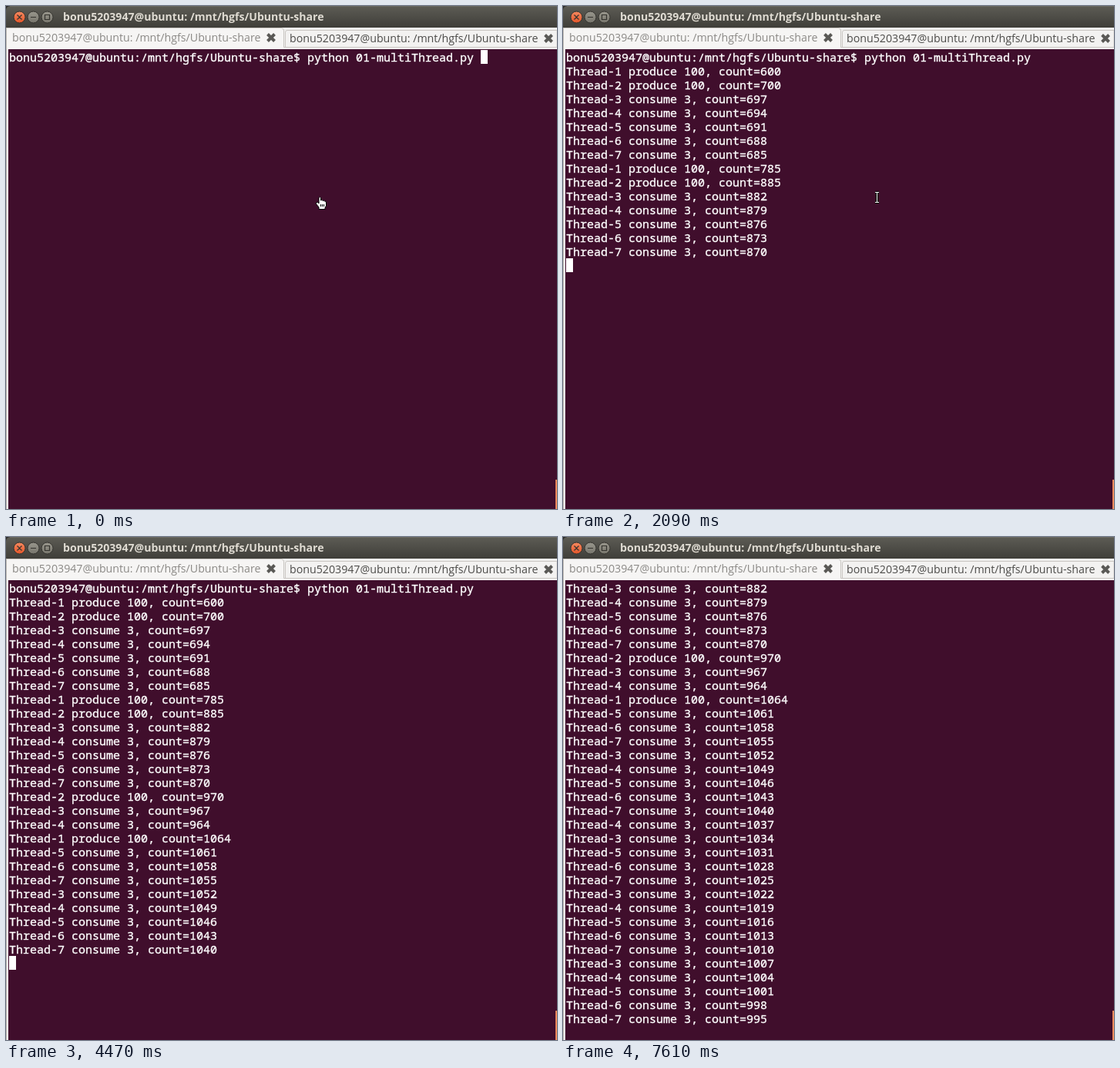
Write an HTML page that moves like this. It is 715 px wide and 652 px high and loops after 8 s.

```html
<!DOCTYPE html>
<html lang="en">
<head>
<meta charset="utf-8">
<title>Terminal</title>
<style>
  html, body { margin: 0; width: 100%; height: 100%; overflow: hidden; background: #400e2c; }
  svg { display: block; }
  text { white-space: pre; }
  .ui { font: 14.2px "Open Sans", "Noto Sans", sans-serif; }
  .title { font-size: 14.1px; font-weight: 700; fill: #dfdbd2; }
  .term { font: 500 15px "Noto Sans Mono", "DejaVu Sans Mono", monospace; fill: #fff; stroke: #fff; stroke-width: .35px; }
</style>
</head>
<body>
<svg width="715" height="652" viewBox="0 0 715 652">
  <defs>
    <linearGradient id="bar" x2="0" y2="1">
      <stop offset="0" stop-color="#5d5c55"/>
      <stop offset="1" stop-color="#3f3e39"/>
    </linearGradient>
    <linearGradient id="red" x2="0" y2="1">
      <stop offset="0" stop-color="#f68a60"/>
      <stop offset="1" stop-color="#e2552a"/>
    </linearGradient>
    <linearGradient id="grey" x2="0" y2="1">
      <stop offset="0" stop-color="#98968c"/>
      <stop offset="1" stop-color="#77756c"/>
    </linearGradient>
    <path id="close" d="M-4.5-4.5L4.5 4.5M4.5-4.5L-4.5 4.5" stroke="#5a5956" stroke-width="4"/>
  </defs>

  <rect width="715" height="652" fill="#400e2c"/>
  <rect width="715" height="28" fill="#2c2b28"/>
  <path d="M0 28V6Q0 0 6 0H715V28Z" fill="url(#bar)"/>
  <path d="M5 .5H715" stroke="#6b6a62"/>
  <g stroke="#34332e">
    <circle cx="17.5" cy="14.5" r="7.5" fill="url(#red)"/>
    <circle cx="35.5" cy="14.5" r="7.5" fill="url(#grey)"/>
    <circle cx="53.5" cy="14.5" r="7.5" fill="url(#grey)"/>
    <path d="M14.5 11.5l6 6m0-6l-6 6M32 14.5h7M50.5 11.5h6v6h-6z" fill="none" stroke-width="1.2"/>
  </g>

  <rect y="28" width="715" height="28" fill="#f2f1f0"/>
  <path d="M362.5 54V34Q362.5 31.5 365 31.5H715V53.5H362.5" fill="#f3f2f1" stroke="#c9c6c2"/>
  <path d="M0 56V28.5H357Q360.5 28.5 360.5 32V56Z" fill="#f6f5f4"/>
  <path d="M0 28.5H357Q360.5 28.5 360.5 32V53.5H715" fill="none" stroke="#c9c6c2"/>
  <rect y="54" width="715" height="2" fill="#f6f5f4"/>
  <rect y="56" width="3" height="596" fill="#f2f1f0"/>
  <rect y="28" width="1" height="624" fill="#b9b6b1"/>
  <use href="#close" x="344" y="41"/>
  <use href="#close" x="704" y="42"/>
  <g class="ui">
    <text class="title head" x="74" y="19"></text>
    <text class="head" x="8" y="46" fill="#8b8986"></text>
    <text class="head" x="368" y="47" fill="#4c4b49"></text>
  </g>

  <g id="rows" class="term"></g>
  <rect id="block" width="9" height="18" fill="#fff"/>
  <rect x="713" y="614" width="2" height="38" fill="#ef8a5c"/>

  <path id="hand" fill="#fff" stroke="#000" stroke-linejoin="round"
    d="M406 263.5V261L402.5 256.5Q402 254 404.5 254.5L406 256V248.5Q407 246.5 408.5 248.5V252Q410 250.5 411 252.5Q412.5 251.5 413.5 253Q415.5 252.5 415.5 255V259L414 261.5V263.5ZM408.5 257V260M410.5 257V260M412.5 257V260"/>
  <g id="beam" fill="none">
    <path id="bar-i" d="M-2.5-6.5H2.5M-2.5 6.5H2.5M0-7V7" stroke="#000" stroke-width="3"/>
    <use href="#bar-i"/>
    <path d="M-2.5-6.5H2.5M-2.5 6.5H2.5M0-7V7" stroke="#fff"/>
  </g>
</svg>
<script>
const LOOP = 8000, ROW = 18, TOP = 57, LEFT = 4, VISIBLE = 33;
const $ = id => document.getElementById(id);
const user = 'bonu5203947@ubuntu:', dir = '/mnt/hgfs/Ubuntu-share';
const prompt = `${user}${dir}$ python 01-multiThread.py `;

document.querySelectorAll('.head').forEach(el => el.textContent = `${user} ${dir}`);

// Threads 1 and 2 add 100 to the shared count, the others take 3.
let count = 500;
const lines = [prompt];
for (const id of '12345671234567234156734567435673456734567') {
  const make = id < 3;
  count += make ? 100 : -3;
  lines.push(`Thread-${id} ${make ? 'produce 100' : 'consume 3'}, count=${count}`);
}

const rows = Array.from({ length: VISIBLE }, (_, i) => {
  const el = document.createElementNS('http://www.w3.org/2000/svg', 'text');
  el.setAttribute('x', LEFT);
  el.setAttribute('y', TOP + 15 + i * ROW);
  return $('rows').appendChild(el);
});

// [start time, lines printed]
const prints = [[0, 0], [900, 1], [1040, 8], [2090, 15], [2990, 22],
  [4020, 27], [5070, 32], [5970, 37], [7010, 42]];
// [start time, cursor lit]
const blinks = [[0, 1], [1490, 0], [2090, 1], [2690, 0], [3280, 1], [3880, 0],
  [4470, 1], [5070, 0], [5670, 1], [6420, 0], [7010, 1], [7610, 0]];
const at = (steps, t) => steps.findLast(s => s[0] <= t)[1];
const show = (el, on) => el.setAttribute('visibility', on ? 'visible' : 'hidden');

function draw(t) {
  const done = at(prints, t);
  const scroll = Math.max(0, done + 1 - VISIBLE);
  rows.forEach((el, i) => {
    const n = i + scroll;
    const s = n < Math.max(done, 1) ? lines[n] : '';
    if (el.textContent !== s) el.textContent = s;
  });

  const block = $('block');
  show(block, at(blinks, t));
  block.setAttribute('x', LEFT + (done ? 0 : prompt.length * 9));
  block.setAttribute('y', TOP + (done - scroll) * ROW);

  show($('hand'), t < 900);
  show($('beam'), t >= 900 && t < 3130);
  $('beam').setAttribute('transform', t < 2990 ? 'translate(407.5 248)' : 'translate(646.5 327)');
}

const start = performance.now();
function tick() {
  draw((performance.now() - start) % LOOP);
  requestAnimationFrame(tick);
}
draw(0);
requestAnimationFrame(tick);
</script>
</body>
</html>
```
